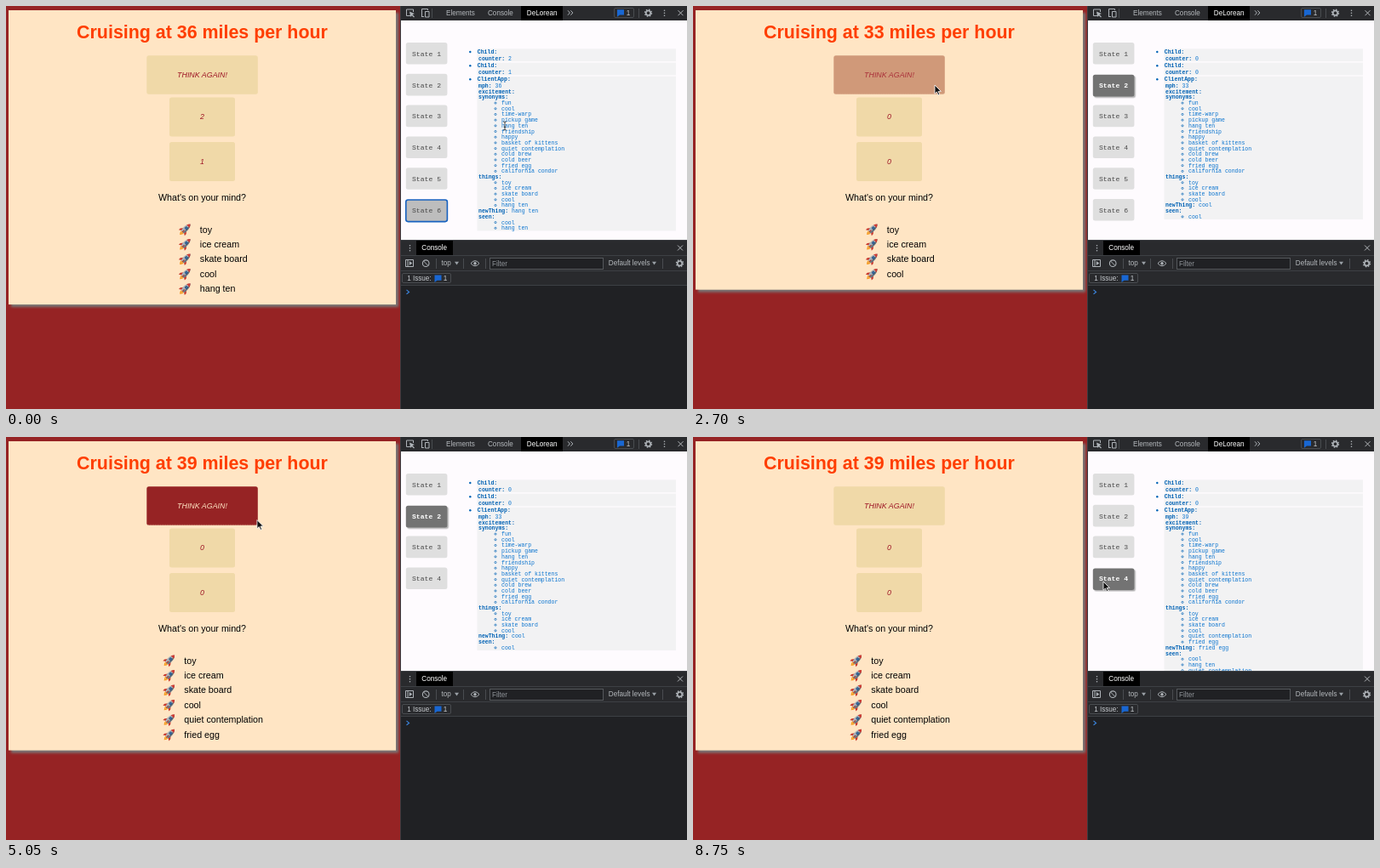
These frames come from a looping animation (800x474 px, 8.8 s). An HTML page:

```html
<!DOCTYPE html>
<html lang="en">
<head>
<meta charset="utf-8">
<title>State time travel</title>
<style>
html, body { margin: 0; width: 100%; height: 100%; overflow: hidden; background: #962324; }
svg { display: block; width: 800px; height: 474px; }
text { font-family: "Liberation Sans", Arial, sans-serif; white-space: pre; }
.mono text { font-family: "Liberation Mono", "Courier New", monospace; }
</style>
</head>
<body>
<svg id="stage" viewBox="0 0 800 474" xmlns="http://www.w3.org/2000/svg">
  <defs>
    <filter id="cardShadow" x="-5%" y="-5%" width="110%" height="110%">
      <feDropShadow dx="3" dy="3" stdDeviation="1.4" flood-color="#777" flood-opacity="1"/>
    </filter>
    <filter id="keyShadow" x="-20%" y="-20%" width="140%" height="150%">
      <feDropShadow dx="1.5" dy="1.5" stdDeviation=".6" flood-color="#aaa" flood-opacity=".9"/>
    </filter>
    <clipPath id="treeClip"><path d="M464 17H800V275H464Z"/></clipPath>
    <g id="rocket" transform="rotate(45)">
      <path d="M-2 4Q-2.6 6.8 0 9.2Q2.6 6.8 2 4Z" fill="#f59a23"/>
      <path d="M-1 4Q-1 6 0 7Q1 6 1 4Z" fill="#ffe06a"/>
      <path d="M-2.2 0L-4.9 3.4V6L-1.8 4Z M2.2 0L4.9 3.4V6L1.8 4Z" fill="#c8372d"/>
      <path d="M0 -8.4C3.6 -5 3.4 1 2 4.6H-2C-3.4 1 -3.6 -5 0 -8.4Z" fill="#a9b4bd"/>
      <path d="M0 -8.4C3.6 -5 3.4 1 2 4.6H.6Q1.8 -2 0 -8.4Z" fill="#63717c"/>
      <path d="M0 -8.4Q1.9 -6.6 2.4 -4.4Q0 -5.4 -2.4 -4.4Q-1.9 -6.6 0 -8.4Z" fill="#d23a30"/>
      <circle cy="-1.8" r="1.5" fill="#2f6fb5" stroke="#2c3e50" stroke-width=".6"/>
      <path d="M-.5 1.6H.5V5.6H-.5Z" fill="#a52a25"/>
    </g>
    <g id="gear" fill="none" stroke="#aeb3b8">
      <circle r="2.7" stroke-width="1.7"/>
      <circle r="4" stroke-width="1.4" stroke-dasharray="1.6 1.54"/>
    </g>
    <g id="dots" fill="#b4b8bc"><circle cy="-3" r=".8"/><circle r=".8"/><circle cy="3" r=".8"/></g>
    <path id="cross" d="M-3 -3L3 3M3 -3L-3 3" stroke="#b4b8bc"/>
    <path id="bubble" d="M0 0H8V6.2H3L0 8.4Z" fill="#1967d2"/>
    <path id="caret" d="M0 0H5L2.5 3.8Z" fill="#9aa0a6"/>
  </defs>
  <path d="M0 0H464V474H0Z" fill="#962324"/>
  <g id="page"></g>
  <path d="M463.5 0H800V474H463.5Z" fill="#202124"/>
  <path d="M464 17H800V275H464Z" fill="#fefbfe"/>
  <g id="keys" class="mono"></g>
  <g id="tree" class="mono" clip-path="url(#treeClip)"></g>
  <g id="tools"></g>
  <path id="arrow" d="M0 0V10.2L2.4 8L4 11.7L5.7 11L4.1 7.4H7.4Z" fill="#111" stroke="#fff" stroke-width=".8"/>
  <path id="beam" d="M-1.8 -5Q0 -5 0 -4V4Q0 5 -1.8 5M1.8 -5Q0 -5 0 -4M0 4Q0 5 1.8 5M-1 1.5H1" fill="none" stroke="#333" stroke-width=".9"/>
</svg>
<script>
const LOOP = 8800;
const $ = id => document.getElementById(id);

function add(parent, tag, attrs, text) {
  const el = document.createElementNS('http://www.w3.org/2000/svg', tag);
  for (const key in attrs) el.setAttribute(key, attrs[key]);
  if (text !== undefined) el.textContent = text;
  parent.append(el);
  return el;
}
const label = (parent, x, y, size, fill, text, more) =>
  add(parent, 'text', { x, y, 'font-size': size, fill, ...more }, text);
const box = (parent, x, y, width, height, fill, more) =>
  add(parent, 'rect', { x, y, width, height, fill, ...more });
const line = (parent, d, stroke, width = 1) =>
  add(parent, 'path', { d, stroke, 'stroke-width': width, fill: 'none' });
const use = (parent, id, x, y) => add(parent, 'use', { href: '#' + id, x, y });
const mid = { 'text-anchor': 'middle' };
const bold = { 'font-weight': 'bold' };

// Application states
const base = ['toy', 'ice cream', 'skate board', 'cool'];
const hang = { mph: 36, counts: [2, 1], things: [...base, 'hang ten'], seen: ['cool', 'hang ten'] };
const cool = { mph: 33, counts: [0, 0], things: base, seen: ['cool'] };
const quiet = { mph: 36, counts: [0, 0], things: [...base, 'quiet contemplation'], seen: [] };
const egg = {
  mph: 39, counts: [0, 0], things: [...quiet.things, 'fried egg'],
  seen: ['cool', 'hang ten', 'quiet contemplation', 'fried egg']
};
const synonyms = ['fun', 'cool', 'time-warp', 'pickup game', 'hang ten', 'friendship', 'happy',
  'basket of kittens', 'quiet contemplation', 'cold brew', 'cold beer', 'fried egg', 'california condor'];

const scenes = [
  { at: 0, page: hang, tree: hang, keys: 6, active: 6, focus: true },
  { at: 1300, page: cool, tree: cool, keys: 6, active: 2 },
  { at: 3200, page: quiet, tree: cool, keys: 3, active: 2 },
  { at: 4300, page: egg, tree: cool, keys: 4, active: 2 },
  { at: 7000, page: egg, tree: egg, keys: 4, active: 4 }
];

// Cursor path: time, x, y
const path = [[0, 586, 141], [150, 586, 141], [1000, 510, 101], [2050, 510, 101], [2600, 284, 93],
  [4900, 284, 93], [5400, 334, 114], [6200, 334, 114], [6800, 482, 170], [LOOP, 482, 170]];

const clamp = v => Math.max(0, Math.min(1, v));
const mix = (a, b, k) => `rgb(${a.map((v, i) => Math.round(v + (b[i] - v) * k))})`;
const SAND = [240, 217, 168], RED = [150, 35, 36], CREAM = [255, 229, 196], INK = [158, 22, 38];

let thinkBox, thinkText, thinkEdge;

function drawPage({ mph, counts, things }) {
  const g = $('page');
  g.replaceChildren();
  box(g, 3, 5, 455, 258.8 + 17.45 * things.length, '#ffe5c4', { filter: 'url(#cardShadow)' });
  label(g, 230.5, 38.3, 21.4, '#ff3e00', `Cruising at ${mph} miles per hour`, { ...mid, ...bold });
  const italic = { ...mid, 'font-style': 'italic' };
  thinkBox = box(g, 165.3, 58.2, 130.5, 45.6, '#f0d9a8', { rx: 2.5 });
  thinkEdge = add(g, 'path', { d: 'M167 103.3H294', stroke: '#ffe5c4', 'stroke-width': .7, 'stroke-dasharray': '1 1' });
  thinkText = label(g, 230.5, 84.2, 8.9, '#9e1626', 'THINK AGAIN!', italic);
  counts.forEach((n, i) => {
    box(g, 192, 107.4 + i * 52.6, 77, 46, '#f0d9a8', { rx: 2.5 });
    label(g, 230.5, 133.4 + i * 52.4, 8.9, '#9e1626', n, italic);
  });
  label(g, 230.5, 228.8, 10.7, '#000', "What's on your mind?", mid);
  const x = things.includes('quiet contemplation') ? 209.3 : 227.8;
  things.forEach((name, i) => {
    const y = 266.5 + 17.45 * i;
    use(g, 'rocket', x - 17.2, y - 4);
    label(g, x, y, 10.7, '#000', name);
  });
}

function drawKeys({ keys, active, focus }) {
  const g = $('keys');
  g.replaceChildren();
  for (let n = 1; n <= keys; n++) {
    const y = 43 + (n - 1) * 36.8, on = n === active;
    const look = focus
      ? { stroke: '#1762c0', 'stroke-width': 1.6 }
      : { filter: 'url(#keyShadow)' };
    box(g, 469.8, y + (on ? 1 : 0), 48.6, 25.6, on ? (focus ? '#bdbdbd' : '#737373') : '#dfdfdf',
      { rx: 2.5, ...(on ? look : {}) });
    const lit = on && !focus;
    label(g, 494, y + 15.8, 8.1, lit ? '#fff' : '#484848', 'State ' + n, lit ? { ...mid, ...bold } : mid);
  }
}

function drawTree({ mph, counts, things, seen }) {
  const g = $('tree');
  g.replaceChildren();
  const STEP = 6.69, SIZE = 6.5, KEY = '#0062b5', VALUE = '#0a74cf';
  const row = (x, y, key, value = '') => {
    label(g, x, y + 2, SIZE, KEY, key + ':', bold);
    if (value !== '') label(g, x + (key.length + 2) * 3.9, y + 2, SIZE, VALUE, value);
  };
  const head = (y, name) => {
    add(g, 'circle', { cx: 545.3, cy: y, r: 1.2, fill: KEY });
    row(553.8, y, name);
  };
  counts.forEach((n, i) => {
    const y = 54 + i * 16.2;
    box(g, 553.5, y - 3.6, 233.5, 14.8, '#f2f2f3');
    head(y, 'Child');
    row(555, y + 7.7, 'counter', n);
  });
  const back = box(g, 553.5, 82.6, 233.5, 10, '#f2f2f3');
  head(86.2, 'ClientApp');
  let y = 94 - STEP;
  const field = (key, value) => row(555, y += STEP, key, value);
  const list = (key, items) => {
    field(key);
    for (const item of items) {
      y += STEP;
      add(g, 'circle', { cx: 575, cy: y, r: 1.1, fill: 'none', stroke: KEY, 'stroke-width': .7 });
      label(g, 582, y + 2, SIZE, VALUE, item);
    }
  };
  field('mph', mph);
  field('excitement');
  list('synonyms', synonyms);
  list('things', things);
  field('newThing', things[things.length - 1]);
  list('seen', seen);
  back.setAttribute('height', y + 3.2 - 82.6);
}

function drawTools() {
  const g = $('tools'), GREY = '#aeb3b8', BAR = '#292a2d', EDGE = '#494c50';
  box(g, 463.5, 0, 336.5, 17, BAR);
  box(g, 605, 0, 49, 17, '#000');
  line(g, 'M476.5 11.5H470.5V4H478.5V7', GREY);
  add(g, 'path', { d: 'M474 6.5L480 9L477.5 10L480 12.8L479 13.6L476.6 11L475.2 13Z', fill: GREY });
  line(g, 'M488.5 12.5V3.5H495.5V5M488 12.5H491M492.5 6.5H497V13H492.5Z', GREY);
  line(g, 'M500.5 3V14M743.5 3V14', EDGE);
  label(g, 517, 11, 8.15, '#b4b8bc', 'Elements');
  label(g, 566, 11, 8.15, '#b4b8bc', 'Console');
  label(g, 611.8, 11, 8.15, '#fff', 'DeLorean');
  line(g, 'M660 5.3L662.4 8L660 10.7M663.4 5.3L665.8 8L663.4 10.7', GREY);
  box(g, 714.5, 2.5, 23, 11, 'none', { rx: 1.5, stroke: EDGE });
  use(g, 'bubble', 718, 4.3);
  label(g, 728.8, 11, 8.15, '#c8ccd0', '1');
  use(g, 'gear', 754.5, 8.2);
  use(g, 'dots', 773.5, 8.2);
  use(g, 'cross', 792.5, 8.2);

  box(g, 463.5, 275, 336.5, 53.5, BAR);
  line(g, 'M463.5 275.5H800M463.5 293.5H800M463.5 311.5H800M463.5 328.5H800', '#3d4044');
  box(g, 482, 276, 43, 17, '#000');
  use(g, 'dots', 474.5, 284.7);
  label(g, 488.3, 287.3, 8.15, '#fff', 'Console');
  use(g, 'cross', 792, 284.5);

  line(g, 'M469.5 298.5H478.5V306.5H469.5ZM472 298.5V306.5', GREY);
  add(g, 'path', { d: 'M473.8 300L477.3 302.5L473.8 305Z', fill: GREY });
  add(g, 'circle', { cx: 493.2, cy: 302.7, r: 3.8, fill: 'none', stroke: GREY, 'stroke-width': 1.1 });
  line(g, 'M490.5 300L495.9 305.4', GREY);
  line(g, 'M505.5 297V309M537.5 297V309M563.5 297V309M771.5 297V309', EDGE);
  label(g, 511.5, 305.4, 8.15, '#b4b8bc', 'top');
  use(g, 'caret', 527, 300.8);
  line(g, 'M546 302.7Q551 296.6 556 302.7Q551 308.8 546 302.7Z', GREY);
  add(g, 'circle', { cx: 551, cy: 302.7, r: 1.7, fill: GREY });
  box(g, 568.5, 296.5, 133, 13, '#202124', { stroke: '#55585c' });
  label(g, 571, 305.8, 8.15, '#8e9398', 'Filter');
  label(g, 707.8, 305.4, 8.15, '#b4b8bc', 'Default levels');
  use(g, 'caret', 759, 300.8);
  use(g, 'gear', 791.5, 302.7);

  box(g, 465.5, 314.5, 57, 11, 'none', { rx: 1.5, stroke: EDGE });
  label(g, 471.2, 323.1, 8.15, '#c8ccd0', '1 Issue:');
  use(g, 'bubble', 503.5, 316.5);
  label(g, 513.8, 323.1, 8.15, '#c8ccd0', '1');
  line(g, 'M470.5 333.9L473.5 336.4L470.5 338.9', '#3b86e0', 1.2);
  line(g, 'M463.5 0V474', '#3a3c40');
}

function cursorAt(t) {
  const i = Math.max(1, path.findIndex(p => p[0] > t));
  const [t0, x0, y0] = path[i - 1], [t1, x1, y1] = path[i];
  const u = clamp((t - t0) / (t1 - t0)), k = u * u * (3 - 2 * u);
  return [x0 + (x1 - x0) * k, y0 + (y1 - y0) * k];
}

let shown;
function render(t) {
  const scene = scenes.filter(s => s.at <= t).pop();
  if (scene !== shown) {
    drawPage(scene.page);
    drawKeys(scene);
    drawTree(scene.tree);
    shown = scene;
  }
  const hover = clamp((t - 2560) / 400) - clamp((t - 5050) / 400);
  thinkBox.setAttribute('fill', mix(SAND, RED, hover));
  thinkText.setAttribute('fill', mix(INK, CREAM, hover * hover));
  thinkEdge.setAttribute('opacity', hover * .5);

  const [x, y] = cursorAt(t), overText = x > 552;
  $('arrow').setAttribute('visibility', overText ? 'hidden' : 'visible');
  $('beam').setAttribute('visibility', overText ? 'visible' : 'hidden');
  for (const id of ['arrow', 'beam']) $(id).setAttribute('transform', `translate(${x} ${y})`);
}

drawTools();
const start = performance.now();
function tick() {
  render((performance.now() - start) % LOOP);
  requestAnimationFrame(tick);
}
tick();
</script>
</body>
</html>
```
